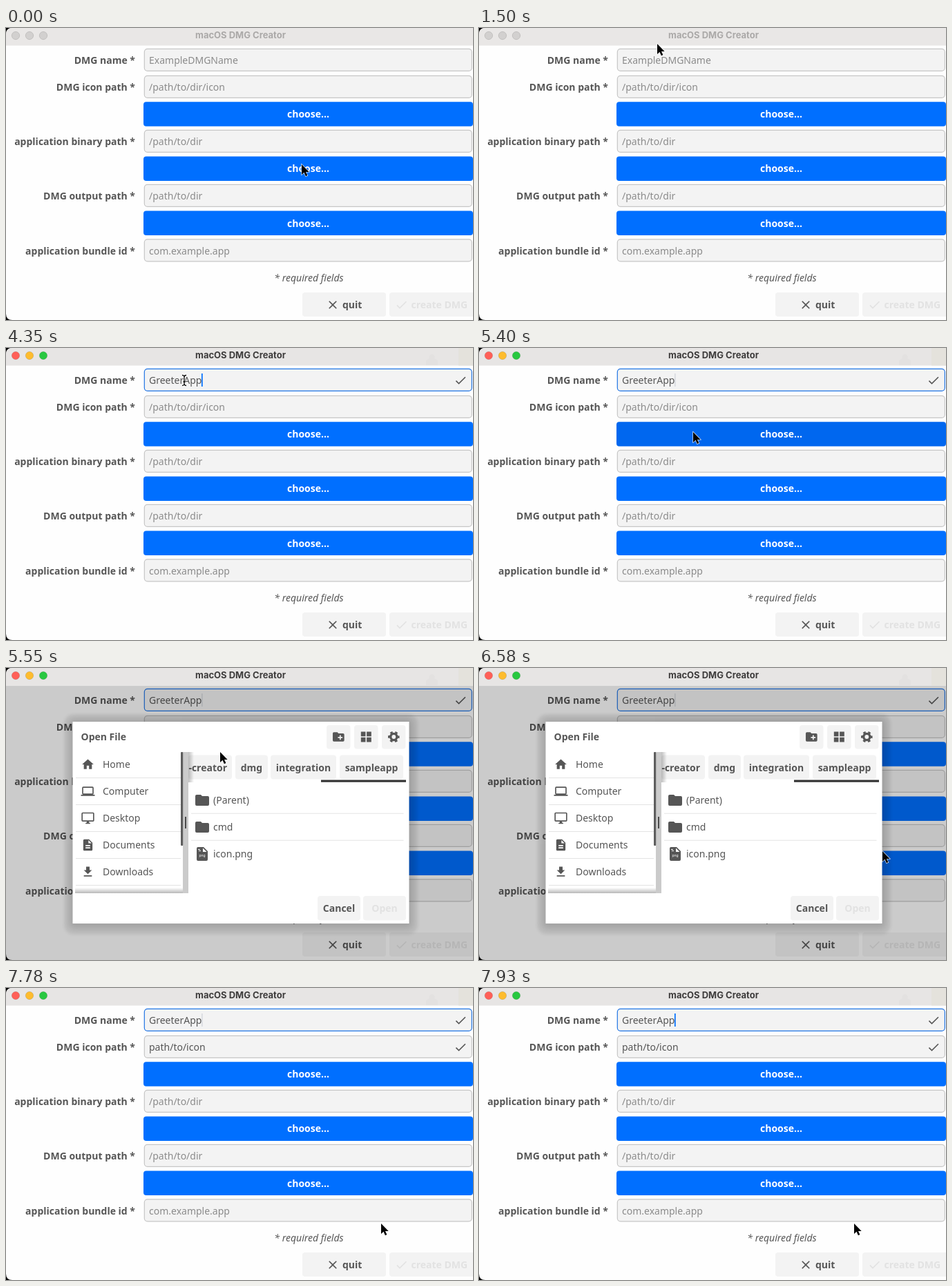
Write an HTML page that moves like this. It is 676x424 px and loops after 8000 ms.

```html
<!DOCTYPE html>
<html lang="en">
<head>
<meta charset="utf-8">
<title>macOS DMG Creator</title>
<style>
  html, body { margin: 0; width: 100%; height: 100%; overflow: hidden; background: #000; }
  svg { display: block; width: 676px; height: 424px; }
  text { font: 14px "Noto Sans", sans-serif; }
  .b { font-weight: 700; }
  .i { font-style: italic; }
  .title { font: 700 13px Inter, sans-serif; }
  .tiny { font-size: 5px; }
</style>
</head>
<body>
<svg id="stage" viewBox="0 0 676 424"></svg>
<script>
const LOOP = 8000, INK = '#565656', BLUE = '#006fff', HOVER = '#0067ef',
  PALE = '#f3f3f3', FAINT = '#e2e2e2', HINT = '#8b8b8b';

// 24 x 24 icon shapes
const ICONS = {
  home: 'M10 20v-6h4v6h5v-8h3L12 3 2 12h3v8z',
  computer: 'M20 18q2 0 2-2V6q0-2-2-2H4Q2 4 2 6v10q0 2 2 2H0v2h24v-2zM4 6h16v10H4z',
  desktop: 'M21 2H3Q1 2 1 4v12q0 2 2 2h7v2H8v2h8v-2h-2v-2h7q2 0 2-2V4q0-2-2-2zM3 4h18v12H3z',
  doc: 'M14 2H6Q4 2 4 4v16q0 2 2 2h12q2 0 2-2V8zM8 16h8v2H8zM8 12h8v2H8zM13 3.5 18.5 9H13z',
  file: 'M14 2H6Q4 2 4 4v16q0 2 2 2h12q2 0 2-2V8zM6 5h3v1H6zM7 7h3v1H7zM13 3.5 18.5 9H13z',
  download: 'M19 9h-4V3H9v6H5l7 7zM5 18v2h14v-2z',
  folder: 'M10 4H4Q2 4 2 6v12q0 2 2 2h16q2 0 2-2V8q0-2-2-2h-8z',
  newFolder: 'M10 4H4Q2 4 2 6v12q0 2 2 2h16q2 0 2-2V8q0-2-2-2h-8zM19 14h-3v3h-2v-3h-3v-2h3V9h2v3h3z',
  grid: 'M3 3h8v8H3zM13 3h8v8h-8zM3 13h8v8H3zM13 13h8v8h-8z',
  close: 'M19 6.4 17.6 5 12 10.6 6.4 5 5 6.4 10.6 12 5 17.6 6.4 19 12 13.4 17.6 19 19 17.6 13.4 12z',
  check: 'M9 16.2 4.8 12 3.4 13.4 9 19 21 7 19.6 5.6z'
};

const rect = (x, y, w, h, fill, r = 0, more = '') =>
  `<rect x="${x}" y="${y}" width="${w}" height="${h}" rx="${r}" fill="${fill}" ${more}/>`;
const text = (x, y, str, fill = INK, cls = '', anchor = 'start') =>
  `<text x="${x}" y="${y}" fill="${fill}" class="${cls}" text-anchor="${anchor}">${str}</text>`;
const icon = (name, cx, cy, fill = INK, size = 20) =>
  `<path transform="translate(${cx - size / 2} ${cy - size / 2}) scale(${size / 24})" fill-rule="evenodd" fill="${fill}" d="${ICONS[name]}"/>`;
const button = (x, y, w, label, bg = PALE, fg = INK) =>
  rect(x, y, w, 35.5, bg, 4) + text(x + w / 2, y + 23, label, fg, 'b', 'middle');

// Pointer waypoints: time, x, y
const PATH = [[0, 428, 198], [750, 428, 198], [900, 429, 200], [1050, 429, 200],
  [1350, 285, 50], [1500, 258, 23], [1650, 258, 40], [1800, 258, 47], [4500, 258, 47],
  [5100, 306, 117], [5250, 310, 122], [5700, 310, 122], [6430, 580, 248], [6580, 584, 266],
  [6730, 584, 266], [6880, 548, 268], [7030, 545, 270], [7180, 544, 300], [7330, 543, 342],
  [LOOP, 543, 342]];

function pointer(t) {
  const n = PATH.findIndex(p => p[0] > t), [t0, x0, y0] = PATH[n - 1], [t1, x1, y1] = PATH[n];
  const k = (t - t0) / (t1 - t0);
  return { x: x0 + (x1 - x0) * k, y: y0 + (y1 - y0) * k };
}

function drawPointer({ x, y }, beam) {
  const at = `transform="translate(${x} ${y})"`;
  if (beam) {
    const d = 'M-3-7.5Q0-7.5 0-5Q0-7.5 3-7.5M0-5V5M-3 7.5Q0 7.5 0 5Q0 7.5 3 7.5M-1.5 2h3';
    return `<g ${at} fill="none"><path d="${d}" stroke="#fff" stroke-width="3"/><path d="${d}" stroke="#000" stroke-width="1.3"/></g>`;
  }
  return `<path ${at} d="M0 0V15L3.5 11.8 5.9 17.2 8.4 16.1 6 10.9H10.7z" stroke="#fff" stroke-width="1.2" paint-order="stroke"/>`;
}

function titleBar(active) {
  const lights = active ? ['#ff5f57', '#febc2e', '#28c840'] : Array(3).fill('#d2d0cf');
  return rect(0, 0, 676, 25.5, active ? '#e7e5e4' : '#e9e7e6') +
    (active ? rect(655, 0, 21, 25.5, '#e4e2dc') +
      '<path d="M608 25V18l5-3a4 4 0 1 1 7 0l5 3v7z" fill="#e3e1e0"/>' : '') +
    lights.map((c, n) => `<circle cx="${14 + 20 * n}" cy="11" r="5.7" fill="${c}" stroke="#000" stroke-opacity=".12"/>`).join('') +
    text(339.5, 15, 'macOS DMG Creator', active ? '#3e3c3c' : '#aba9a8', 'title', 'middle');
}

function field(y, label, hint, value, focus) {
  return text(187, y + 22, label + ' *', INK, 'b', 'end') +
    rect(200.3, y + .3, 474, 32, PALE, 4.5, `stroke="${focus ? '#1f74e4' : '#c6c6c6'}" stroke-width="1.2"`) +
    text(207, y + 22, value || hint, value ? INK : HINT) +
    (value ? icon('check', 658, y + 17) : '');
}

function form(t, name, picked, hover) {
  // advance widths of the typed letters, in em
  const em = [.728, .413, .564, .564, .361, .564, .413, .639, .615, .615];
  const caretX = 206.3 + 14 * em.slice(0, name.length).reduce((a, b) => a + b, 0);
  const focus = t >= 1950;
  const lit = t < 2250 || t >= 2850 && t < 5250 || t >= 6000 && t < 6580 || t >= 7930;
  const choose = (y, bg = BLUE) => button(199, y, 477, 'choose...', bg, '#fff');
  return field(30, 'DMG name', 'ExampleDMGName', name, focus) +
    (focus ? rect(caretX, 37, 1.7, 19, lit ? BLUE : '#d8dbe0') : '') +
    field(69, 'DMG icon path', '/path/to/dir/icon', picked && 'path/to/icon') + choose(107.2, hover ? HOVER : BLUE) +
    field(148, 'application binary path', '/path/to/dir') + choose(186.4) +
    field(227, 'DMG output path', '/path/to/dir') + choose(265.6) +
    field(306.5, 'application bundle id', 'com.example.app') +
    text(438.5, 367.5, '* required fields', INK, 'i', 'middle') +
    rect(429, 384, 121, 35, PALE, 4) + icon('close', 473, 402) + text(487, 407, 'quit', INK, 'b') +
    rect(555, 384, 125, 35, PALE, 4) + icon('check', 572.5, 402, FAINT) + text(586.5, 407, 'create DMG', FAINT, 'b');
}

function dialog(p, chosen) {
  const places = ['Home', 'Computer', 'Desktop', 'Documents', 'Downloads'];
  const marks = ['home', 'computer', 'desktop', 'doc', 'download'];
  const files = ['(Parent)', 'cmd', 'icon.png'];
  const tools = [464, 504, 544].map(x => rect(x, 83, 34.5, 34.5, PALE, 4)).join('') +
    icon('newFolder', 481.3, 100) + icon('grid', 521.3, 100) +
    `<g fill="none" stroke="${INK}"><circle cx="561.3" cy="100" r="4.6" stroke-width="3.4"/>
     <circle cx="561.3" cy="100" r="7" stroke-width="2.6" stroke-dasharray="3.7 3.63" stroke-dashoffset="1.85"/></g>`;
  const side = places.map((name, n) => {
    const y = 140 + 39 * n;
    return icon(marks[n], 118.5, y) + text(140, y + 5, name) + rect(101, y + 19, 152, 1, '#e3e3e3');
  }).join('');
  const chips = [[264, 63, '-creator'], [332, 47, 'dmg'], [383, 95, 'integration'], [483, 92, 'sampleapp']]
    .map(([x, w, s], n) => rect(x, 126.5, w, 35, PALE, 4) +
      (n ? text(x + w / 2, 150, s, INK, 'b', 'middle') : text(320, 150, s, INK, 'b', 'end'))).join('');
  const list = files.map((name, n) => {
    const y = 192 + 39 * n, over = p.x > 268 && p.x < 575 && Math.abs(p.y - y) < 18;
    const bg = chosen && n === 2 ? '#b8d9ff' : over ? '#f0f0f0' : '';
    return (n < 2 ? rect(268, y + 18.7, 307.5, 1, '#e3e3e3') : '') +
      (bg ? rect(268, y - 18, 307.5, 35.5, bg, 3) : '') +
      icon(n < 2 ? 'folder' : 'file', 284, y, INK, 24) + text(300, y + 5, name);
  }).join('') + text(284, 274, 'png', '#fff', 'tiny', 'middle');
  const overOpen = p.x > 517 && p.x < 579 && p.y > 331 && p.y < 367;
  return rect(0, 25.5, 676, 399, '#000', 0, 'opacity=".2"') +
    rect(84, 67, 512, 320, '#000', 14, 'opacity=".07" style="filter:blur(2px)"') +
    rect(92, 74, 496, 304, '#000', 6, 'opacity=".12" style="filter:blur(4px)"') +
    rect(96.5, 78, 487, 293, '#fff') + text(108.5, 105, 'Open File', INK, 'b') +
    tools + side + chips + list +
    rect(264, 122, 8, 44, 'url(#right)') + rect(456, 162.5, 123, 3.2, '#333') +
    rect(100, 319, 157, 8, 'url(#up)') + rect(256, 122, 8, 205, '#cbcbcb') +
    rect(253, 122, 3.2, 136, '#5e5e5e', 1) + rect(259, 216, 2, 17, '#4a4a4a') +
    (chosen ? text(108.5, 354, 'icon.png') : '') +
    button(451, 331, 62, 'Cancel') +
    button(517, 331, 62, 'Open', chosen ? overOpen ? HOVER : BLUE : PALE, chosen ? '#fff' : FAINT);
}

const DEFS = `<defs>
  <clipPath id="win"><path d="M676 0H9Q0 0 0 9V415Q0 424 9 424H676z"/></clipPath>
  <linearGradient id="right"><stop stop-opacity=".25"/><stop offset="1" stop-opacity="0"/></linearGradient>
  <linearGradient id="up" x2="0" y2="1"><stop stop-opacity="0"/><stop offset="1" stop-opacity=".28"/></linearGradient>
</defs>`;

function scene(t) {
  const p = pointer(t), open = t >= 5550 && t < 7780;
  const name = 'GreeterApp'.slice(0, typed(t));
  const hover = t >= 4650 && t < 5550 && p.y > 107;
  const beam = t >= 1800 && t < 5550 && p.y < 63;
  return DEFS + '<g clip-path="url(#win)">' + rect(0, 0, 676, 424, '#fefefe') +
    form(t, name, t >= 7780, hover) + (open ? dialog(p, t >= 7030) : '') +
    titleBar(t >= 1800) + '</g>' + drawPointer(p, beam);
}

// One letter per tick, with a short pause before the last two
function typed(t) {
  if (t < 2850) return 0;
  return t < 4200 ? Math.min(8, (t - 2700) / 150 | 0) : t < 4350 ? 9 : 10;
}

// The screen refreshes every 150 ms; one tick comes early, at 6430
const tick = t => t < 6430 ? t - t % 150 : t - (t - 6430) % 150;

const stage = document.getElementById('stage'), start = performance.now();
let shown = -1;
function frame(now) {
  const t = tick(Math.max(0, now - start) % LOOP);
  if (t !== shown) stage.innerHTML = scene(shown = t);
  requestAnimationFrame(frame);
}
frame(start);
</script>
</body>
</html>
```
